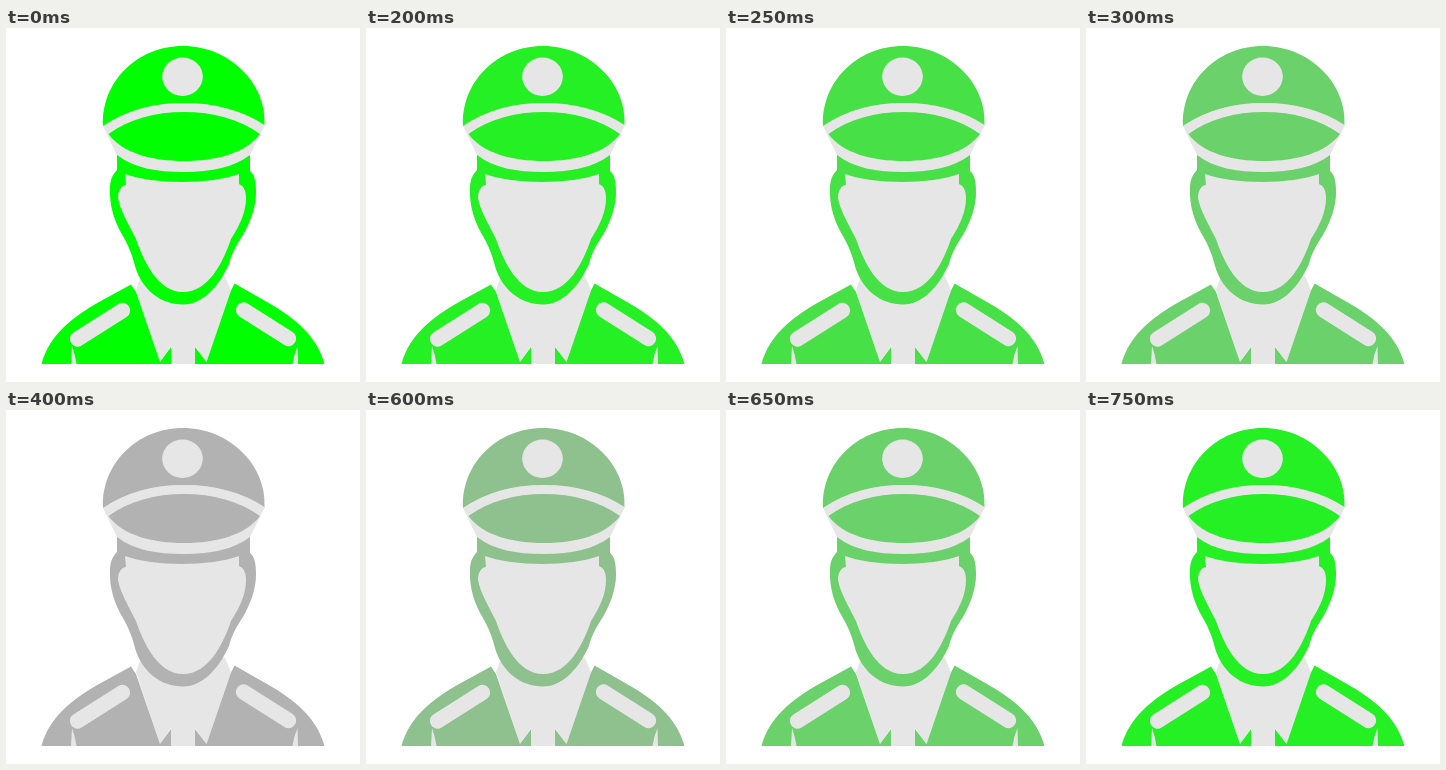
These frames come from a looping animation (354 px wide and 354 px high, 0.8 s). An HTML page:

```html
<!DOCTYPE html>
<html lang="en">
<head>
<meta charset="utf-8">
<title>Officer icon</title>
<style>
  html, body { margin: 0; width: 100%; height: 100%; overflow: hidden; background: #fff; }
  svg { display: block; width: 100vw; height: 100vh; }
  .light { fill: #e6e6e6; }
  .strap { stroke: #e6e6e6; stroke-width: 15.3; stroke-linecap: round; }
</style>
</head>
<body>
<svg viewBox="0 0 354 354">
  <!-- shirt and tie -->
  <path class="light" d="M135 248L130 262L154 334L165 318V336H189V318L200.500 334L225 262L219 248Z"/>

  <g id="tint">
    <!-- jacket -->
    <path d="M35.500 336C43 308 65 290 93 274L125 256.500L130 264L154 334L165 319V336Z"/>
    <path d="M318.500 336C311 308 289 290 261 274L228.500 255.500L224.800 263L200.500 334L189 319V336Z"/>
    <!-- head -->
    <path d="M111 126V142C106 147 104 153 104 160C103 178 109 195 117 208C122 217 126 226 129 238C136 262 155 276.500 177 276.500C197 276.500 213 258 223 236C226 224 231 216 237 207C245 193 250 178 250 165C250 152 248 146 244 143V126Z"/>
  </g>

  <!-- face -->
  <path class="light" d="M119 146L120 157C114 158 112 164 112 170C114 182 122 195 130 211C138 234 152 264 177 264C203 264 217 234 225 211C234 197 240 184 240 170C240 163 238 158 233 156V146C205 156.500 147 156.500 119 146Z"/>

  <!-- cap -->
  <path class="light" d="M97 98C120 82 148 75 178 75C208 75 236 82 259 97L244 127C228 139 206 144 178 144C150 144 128 140 111 127Z"/>
  <g id="cap">
    <path d="M97 98C95 55 130 18 177 18C224 18 261 56 258.500 97C236 82 208 75 178 75C148 75 120 82 97 98Z"/>
    <path d="M102.500 106C123 91 149 84 178 84C207 84 233 91 254 106C240 125 210 133 178 133C146 133 116 125 102.500 106Z"/>
  </g>
  <ellipse class="light" cx="176.500" cy="48.700" rx="20.300" ry="19.200"/>

  <!-- shoulder straps and sleeve slits -->
  <path class="strap" d="M71.500 311L116.500 282.500M237.500 282L282.500 310.500"/>
  <path class="light" d="M66 318Q69 326 70.500 336H65ZM291.500 318Q288 326 286.500 336H292Z"/>
</svg>
<script>
  const LOOP = 800, STEP = 50, LEVELS = 5;
  const GREEN = [0, 255, 0], GRAY = [178, 178, 178];
  const parts = ["tint", "cap"].map(id => document.getElementById(id));

  // Holds green, steps down to gray, holds, then steps back up.
  function level(t) {
    if (t < 200) return 0;
    if (t < 400) return Math.floor((t - 200) / STEP) + 1;
    if (t < 600) return LEVELS;
    return LEVELS - 1 - Math.floor((t - 600) / STEP);
  }

  function draw(now) {
    const k = level(now % LOOP) / LEVELS;
    const rgb = GREEN.map((c, i) => Math.round(c + (GRAY[i] - c) * k));
    for (const p of parts) p.setAttribute("fill", `rgb(${rgb})`);
  }

  const start = performance.now();
  function tick() {
    draw(performance.now() - start);
    requestAnimationFrame(tick);
  }
  tick();
</script>
</body>
</html>
```
